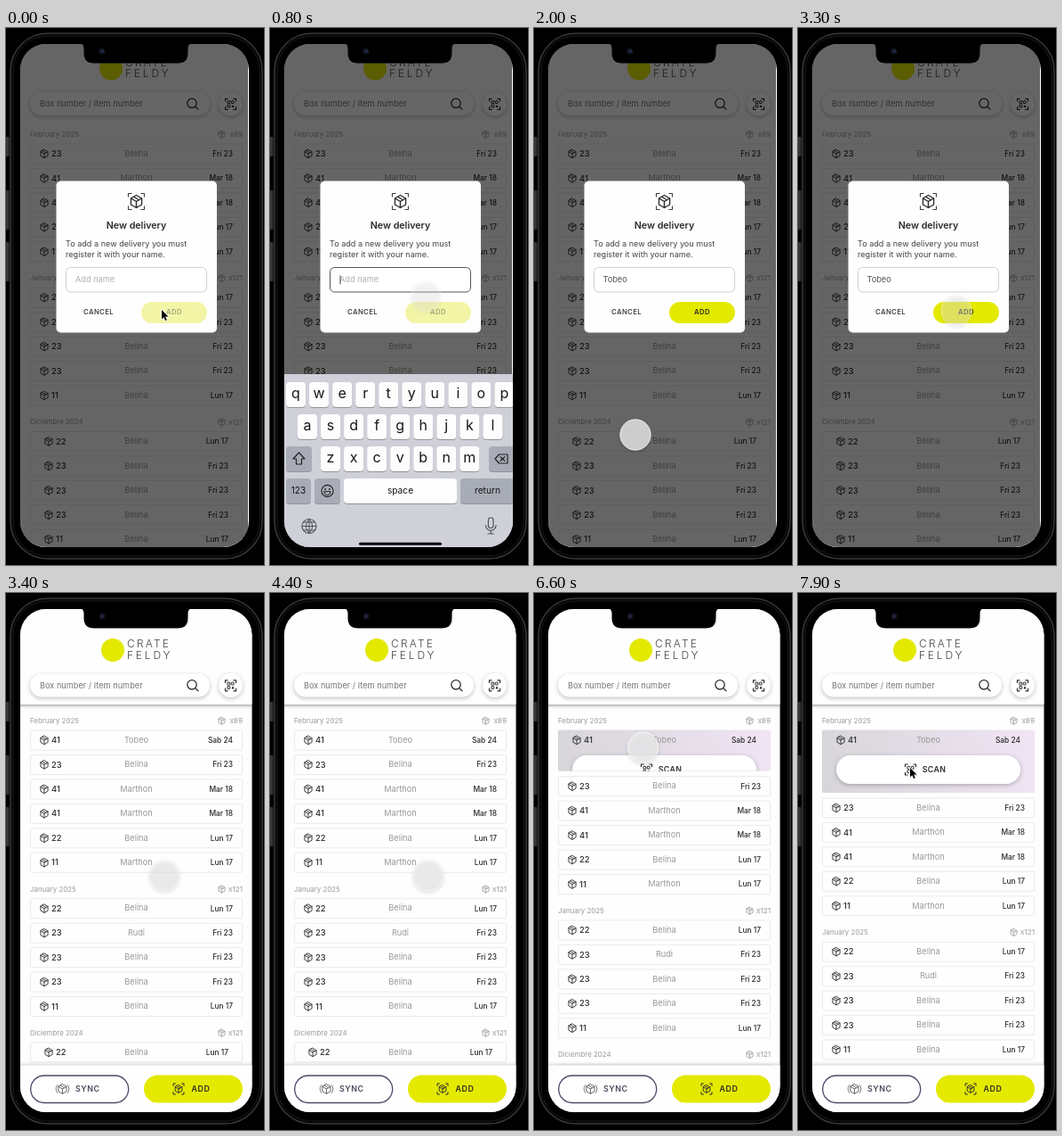
An HTML page with a canvas for the animation above (8000 ms loop, 290 by 602 pixels).

```html
<!DOCTYPE html>
<html lang="en">
<head>
<meta charset="utf-8">
<title>New delivery</title>
<style>
  html, body { margin: 0; width: 100%; height: 100%; overflow: hidden; background: #000; }
  canvas { display: block; width: 290px; height: 602px; }
</style>
</head>
<body>
<canvas id="stage"></canvas>
<script>
const W = 290, H = 602, MID = 146.5, LOOP = 8000, STEP = 100;
const YELLOW = '#e4e900', INK = '#2b2b2b', GREY = '#999', TAU = Math.PI * 2;
const ROW = 27.45, OPEN = 48.5;
const KEYBOARD_AT = 700, NAMED_AT = 1900, ADDED_AT = 3400, OPEN_AT = 6500;

const canvas = document.getElementById('stage');
const ctx = canvas.getContext('2d');
const dpr = window.devicePixelRatio || 1;
canvas.width = W * dpr;
canvas.height = H * dpr;

const DAYS = { 11: 'Lun 17', 22: 'Lun 17', 23: 'Fri 23', 41: 'Mar 18' };
const parse = str => str.split(', ').map(item => {
  const [box, name = 'Belina'] = item.split(' ');
  return { box, name, day: DAYS[box] };
});
const FEBRUARY = parse('23, 41 Marthon, 41 Marthon, 22, 11 Marthon');
const JANUARY = parse('22, 23 Rudi, 23, 23, 11');
const DECEMBER = parse('22, 23, 23, 23, 11');
const ADDED = { box: '41', name: 'Tobeo', day: 'Sab 24' };

// The pointer rests at each stop from `from` to `to` and glides in between.
const STOPS = [
  { x: 175, y: 316, from: 0, to: 0 },
  { x: 175, y: 301, from: 100, to: 600, tap: true },
  { x: 114, y: 456, from: 1600, to: 2000, tap: true },
  { x: 178, y: 317, from: 3100, to: 4500, tap: true },
  { x: 122.5, y: 163, from: 5700, to: 5900 },
  { x: 122.5, y: 173, from: 6000, to: 7200, tap: true },
  { x: 126, y: 196, from: 7900, to: LOOP }
];

const clamp = v => Math.max(0, Math.min(1, v));
const mix = (a, b, p) => a + (b - a) * p;
const easeOut = p => 1 - (1 - p) ** 3;

function text(str, x, y, size, color, { weight = 400, space = 0, align = 'left' } = {}) {
  ctx.font = `${weight} ${size}px Inter, "Open Sans", sans-serif`;
  ctx.letterSpacing = space + 'px';
  ctx.textAlign = align;
  ctx.textBaseline = 'middle';
  ctx.fillStyle = color;
  ctx.fillText(str, x, y);
}

function box(x, y, w, h, r, fill, stroke, lw = 1) {
  ctx.beginPath();
  ctx.roundRect(x, y, w, h, r);
  if (fill) { ctx.fillStyle = fill; ctx.fill(); }
  if (stroke) { ctx.strokeStyle = stroke; ctx.lineWidth = lw; ctx.stroke(); }
}

function shadowed(alpha, blur, dy, draw) {
  ctx.save();
  ctx.shadowColor = `rgba(0,0,0,${alpha})`;
  ctx.shadowBlur = blur * dpr;
  ctx.shadowOffsetY = dy * dpr;
  draw();
  ctx.restore();
}

// Strokes an SVG path placed at x, y.
function icon(d, x, y, color, lw) {
  ctx.save();
  ctx.translate(x, y);
  ctx.strokeStyle = color;
  ctx.lineWidth = lw;
  ctx.lineJoin = ctx.lineCap = 'round';
  ctx.stroke(new Path2D(d));
  ctx.restore();
}

function disc(x, y, r, fill) {
  ctx.beginPath();
  ctx.arc(x, y, r, 0, TAU);
  ctx.fillStyle = fill;
  ctx.fill();
}

function arc(x, y, r, color, lw, from = 0, to = TAU) {
  ctx.beginPath();
  ctx.arc(x, y, r, from, to);
  ctx.strokeStyle = color;
  ctx.lineWidth = lw;
  ctx.stroke();
}

function cube(x, y, r, color, lw = 0.9) {
  const w = r * 0.87, h = r / 2;
  icon(`M0 ${-r}L${w} ${-h}V${h}L0 ${r}L${-w} ${h}V${-h}Z
    M${-w} ${-h}L0 0L${w} ${-h}M0 0V${r}M${-w / 2} ${-r * 0.75}L${w / 2} ${-h / 2}`, x, y, color, lw);
}

function corners(x, y, s, len, color, lw) {
  for (const a of [-1, 1]) for (const b of [-1, 1]) {
    icon(`M${a * (s - len)} ${b * s}H${a * s}V${b * (s - len)}`, x, y, color, lw);
  }
}

function scanIcon(x, y) {
  corners(x, y, 6, 2.6, INK, 1.2);
  for (const [a, b] of [[-1, -1], [1, -1], [-1, 1]]) {
    box(x + a * 2.2 - 1.4, y + b * 2.2 - 1.4, 2.8, 2.8, 0.3, null, INK);
  }
  box(x + 1.4, y + 1.4, 2.2, 2.2, 0, INK);
}

function phone() {
  ctx.fillStyle = '#000';
  ctx.fillRect(0, 0, W, H);
  for (const [y, h] of [[122, 22], [182, 44], [240, 44]]) box(0, y, 3.5, h, 1, '#34373a');
  box(5, 6, 283, 589, 42, '#060606', '#38383a', 1.5);
  box(8, 9, 277, 583, 39, '#000', '#18181a', 1);
}

function notch() {
  icon('', 0, 0);
  ctx.fillStyle = '#000';
  ctx.fill(new Path2D('M83 17Q87.5 18 87.5 23V28Q87.5 39.5 99 39.5H193Q204.5 39.5 204.5 28V23Q204.5 18 209 17Z'));
  disc(108, 26, 3.6, '#10131c');
  disc(108, 26, 1.7, '#232c4a');
}

function header(dim) {
  const dy = dim ? -18.5 : 0, lx = dim ? -2 : 0;
  if (!dim) shadowed(0.45, 4, 1, () => box(10, 10, 275, 115, 0, '#fefefe'));
  disc(120 + lx, 64 + dy, 13, YELLOW);
  text('CRATE', 136 + lx, 57.5 + dy, 12, '#444', { weight: 300, space: 2.2 });
  text('FELDY', 136 + lx, 70 + dy, 12, '#444', { weight: 300, space: 2.8 });
  shadowed(0.25, 5, 1.5, () => {
    box(27, 90.5 + dy, 202, 26, 13, '#fff');
    disc(252.5, 103.5 + dy, 13.5, '#fff');
  });
  text('Box number / Item number', 38, 104 + dy, 9.2, '#777');
  arc(209, 102.8 + dy, 5.2, INK, 1.3);
  icon('M0 0L3.2 3.2', 212.8, 106.6 + dy, INK, 1.3);
  scanIcon(252.5, 103.8 + dy);
}

function rowText(item, y, inset) {
  cube(43 + inset, y, 4.7, INK);
  text(item.box, 51 + inset, y + 0.3, 9.4, INK, { weight: 500 });
  text(item.name, MID, y, 9.2, GREY, { align: 'center' });
  text(item.day, 255 - inset, y + 0.3, 8.4, INK, { weight: 500, align: 'right' });
}

function row(item, y, inset) {
  box(27.5, y - 11, 238, 22, 1.5, '#fefefe', '#eaeaec');
  rowText(item, y, inset);
}

function openRow(item, y, p) {
  const shade = ctx.createLinearGradient(27, 0, 266, 0);
  shade.addColorStop(0, '#d8d6da');
  shade.addColorStop(1, '#f0e4f4');
  ctx.save();
  box(27, y - 11.5, 239, 22 + OPEN * p, 1.5, shade);
  ctx.clip();
  shadowed(0.25, 5, 1.5, () => box(43, y + 17, 207, 32, 16, '#fff'));
  scanIcon(126.5, y + 33);
  text('SCAN', 139.7, y + 33.2, 8.8, INK, { weight: 600, space: 0.4 });
  ctx.restore();
  rowText(item, y, 5);
}

function list(top, hasAdded, open) {
  let y = top;
  const section = (title, count, items, inset = 0) => {
    text(title, 27, y + 0.6, 7.9, GREY);
    cube(242.5, y + 0.3, 4, GREY, 0.8);
    text(count, 266, y + 0.6, 8.2, GREY, { align: 'right' });
    y += 22;
    for (const item of items) {
      if (item === ADDED && open) {
        openRow(item, y, open);
        y += OPEN * open;
      } else row(item, y, inset);
      y += ROW;
    }
    y += 2;
  };
  section('February 2025', 'x89', hasAdded ? [ADDED, ...FEBRUARY] : FEBRUARY);
  section('January 2025', 'x121', JANUARY);
  section('Diciembre 2024', 'x121', DECEMBER, 5);
}

function footer() {
  const label = { weight: 600, space: 0.6 };
  shadowed(0.28, 5, -1, () => box(10, 529.5, 275, 60, 0, '#fefefe'));
  box(27.7, 541, 110, 30.5, 15.2, '#fff', '#54476a', 1.3);
  cube(63.5, 556, 5.3, '#555');
  for (const turn of [0, Math.PI]) arc(63.5, 556, 7.3, '#777', 1, turn - 0.7, turn + 0.7);
  text('SYNC', 78, 556.4, 8.8, '#4a4358', label);
  box(155, 540.5, 111, 31, 15.5, YELLOW);
  cube(194, 556, 4.4, INK);
  corners(194, 556, 6, 2.4, INK, 1);
  text('ADD', 208.5, 556.4, 8.8, INK, label);
}

function modal(focused, filled) {
  const label = { weight: 600, space: 0.4, align: 'center' };
  box(56.5, 171.5, 180.5, 170, 5, '#fefefe');
  cube(MID, 194.5, 7, INK, 1.4);
  corners(MID, 194.5, 9, 3.6, '#4a4638', 1.2);
  text('New delivery', MID, 221.5, 10.7, INK, { weight: 600, align: 'center' });
  text('To add a new delivery you must', 67, 242, 9.1, '#444');
  text('register it with your name.', 67, 254.5, 9.1, '#444');
  box(67.5, 268.5, 158, 27.5, 5, '#fff', focused ? '#555' : '#cfcfd6');
  if (filled) text(ADDED.name, 77.5, 282.3, 9.2, '#555');
  else text('Add name', 78, 282.3, 9.2, '#b2b2b6');
  if (focused) icon('M0 0V9', 79, 278, '#444', 1);
  text('CANCEL', 104, 319, 7.7, '#45414f', label);
  box(152, 307, 74, 24, 12, filled ? YELLOW : '#f3f5a6');
  text('ADD', 189, 319, 7.7, filled ? INK : '#a3a47c', label);
}

function key(label, x, y, w, { size = 10.2, dark = false } = {}) {
  box(x, y + 1, w, 28, 4, '#92949b');
  box(x, y, w, 28, 4, dark ? '#a8acb7' : '#fdfdfd');
  text(label, x + w / 2, y + 13.5, size, '#161616', { align: 'center' });
}

function keyboard() {
  const dark = { dark: true }, line = '#50535a';
  box(16, 388, 258, 195, 0, '#cfd0d8');
  ['qwertyuiop', 'asdfghjkl', 'zxcvbnm'].forEach((letters, r) => {
    const left = 18 + 13 * (10 - letters.length);
    [...letters].forEach((c, i) => key(c, left + i * 26.05, 397 + r * 36, 22, { size: 16 }));
  });
  key('', 18, 469, 29, dark);
  key('', 246, 469, 29, dark);
  key('123', 18, 505, 28, dark);
  key('', 50, 505, 29, dark);
  key('space', 83, 505, 127);
  key('return', 214, 505, 61, dark);

  icon('M0 -7L-6.5 0H-3V6H3V0H6.5Z', 32.5, 483, '#222', 1.2);
  icon('M0 0L4.5 -5H14V5H4.5ZM6 -2.3L10.8 2.3M10.8 -2.3L6 2.3', 253, 483, '#222', 1.2);
  arc(64.5, 519, 6.6, '#222', 1.1);
  for (const side of [-1, 1]) disc(64.5 + side * 2.3, 517, 0.9, '#222');
  icon('M-3.6 0H3.6Q3 4 0 4T-3.6 0', 64.5, 519.7, '#222', 1);

  arc(44, 558.5, 8, line, 1.1);
  icon('M-8 0H8M0 -8V8M-6.5 -4.5H6.5M-6.5 4.5H6.5M0 -8Q-7.6 0 0 8Q7.6 0 0 -8', 44, 558.5, line, 1);
  box(245.4, 549, 5.6, 11.5, 2.8, null, line, 1.2);
  icon('M-5.8 0A5.8 5.8 0 0 0 5.8 0M0 5.8V9.5M-3.2 9.5H3.2', 248.2, 557.5, line, 1.2);
  box(100, 576.7, 93, 3, 1.5, '#000');
}

function pointer(t) {
  const i = STOPS.findLastIndex(s => t >= s.from);
  const here = STOPS[i], next = STOPS[i + 1] || here;
  const leave = here.to + (here.tap ? 200 : 0);
  const p = next === here ? 0 : easeOut(clamp((t - leave) / (next.from - leave)));
  const x = mix(here.x, next.x, p), y = mix(here.y, next.y, p);
  const touch = here.tap ? clamp((t - here.from) / 400) * clamp(1 - (t - here.to) / 300) : 0;

  ctx.save();
  if (touch > 0.1) {
    ctx.globalAlpha = touch;
    shadowed(0.2, 4, 1.5, () => disc(x, y, 17.3, 'rgba(239,239,239,.78)'));
    arc(x, y, 17.2, 'rgba(250,250,250,.75)', 1);
  } else {
    const arrow = 'M0 0V10.4L2.4 8.3L4 12L5.8 11.2L4.2 7.6L7.5 7.4Z';
    icon(arrow, x, y, '#fff', 1.6);
    ctx.translate(x, y);
    ctx.fillStyle = '#000';
    ctx.fill(new Path2D(arrow));
  }
  ctx.restore();
}

function draw(t) {
  const adding = t < ADDED_AT;
  const typing = t >= KEYBOARD_AT && t < NAMED_AT;

  ctx.setTransform(dpr, 0, 0, dpr, 0, 0);
  phone();
  ctx.save();
  box(16, 18, adding ? 257 : 260.5, 564, 29, '#fefefe');
  ctx.clip();
  list(adding ? 119 : 143, !adding, clamp((t - OPEN_AT) / 200));
  header(adding);
  if (adding) {
    box(16, 17, 256, 566, 0, 'rgba(0,0,0,.6)');
    modal(typing, t >= NAMED_AT);
    if (typing) keyboard();
  } else footer();
  ctx.restore();
  notch();
  pointer(t);
}

function frame(now) {
  draw(Math.floor((now % LOOP) / STEP) * STEP);
  requestAnimationFrame(frame);
}
requestAnimationFrame(frame);
</script>
</body>
</html>
```
